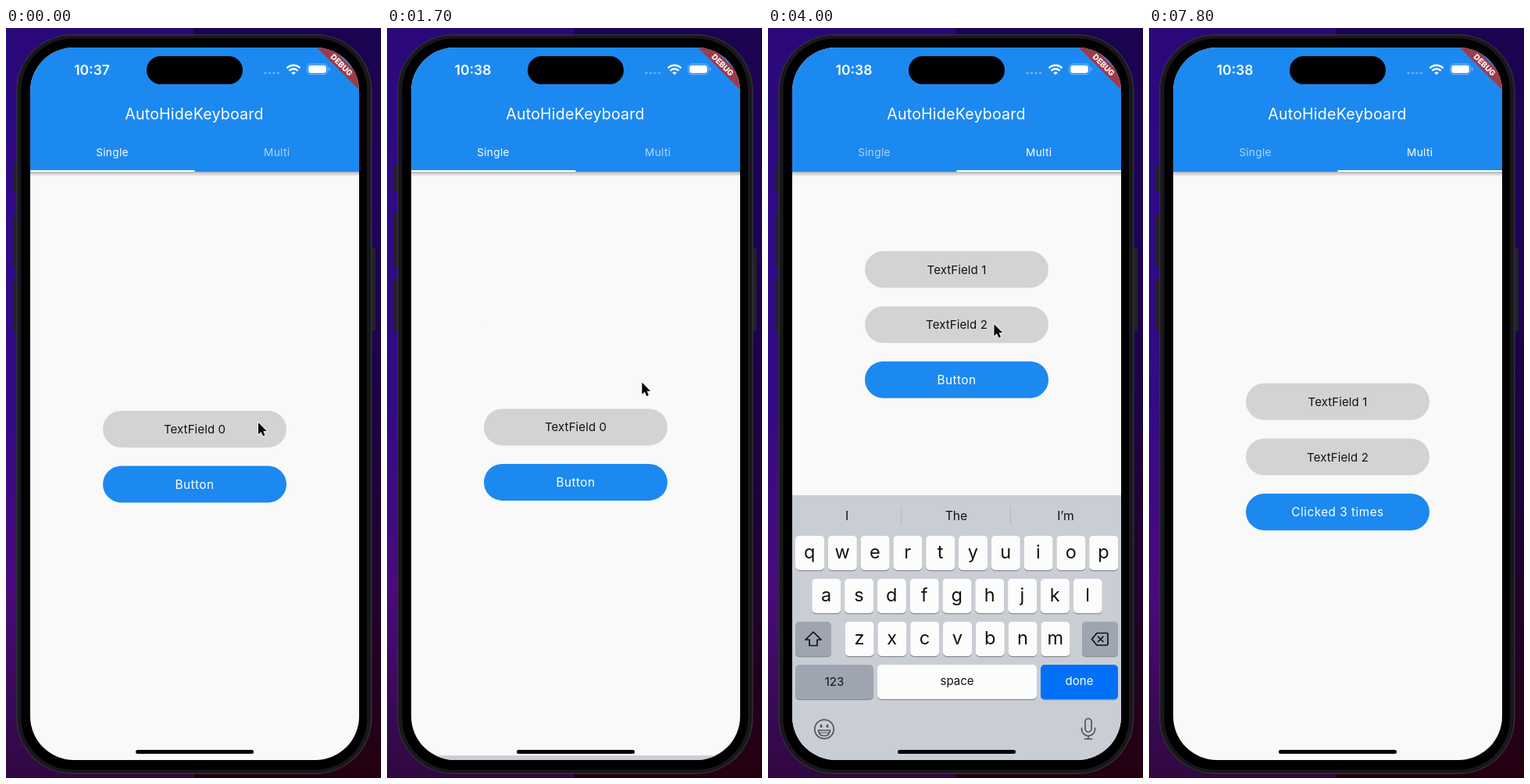
Animation, 480 px wide and 960 px high, one loop 7.9 s. Source, as an HTML page:

```html
<!DOCTYPE html>
<html lang="en">
<head>
<meta charset="utf-8">
<title>AutoHideKeyboard</title>
<style>
  html, body { margin: 0; width: 100%; height: 100%; overflow: hidden; background: #16002c; }
  svg { display: block; width: 100vw; height: 100vh; }
  text { font-family: Inter, Roboto, sans-serif; text-anchor: middle; }
</style>
</head>
<body>
<svg id="stage" viewBox="0 0 480 960"></svg>
<script>
const BLUE = '#1c89f0', PAPER = '#f9f9fa', FIELD = '#d3d3d4', INK = '#111113';
const KEYBOARD = '#c9ced5', GREY_KEY = '#9fa5b0', ICON = '#50555c';
const LOOP = 7900, PAGE = 421, KB = 339;

const rect = (x, y, w, h, fill, r = 0, extra = '') =>
  `<rect x="${x}" y="${y}" width="${w}" height="${h}" rx="${r}" fill="${fill}" ${extra}/>`;
const text = (s, x, y, size, fill = INK, extra = '') =>
  `<text x="${x}" y="${y}" font-size="${size}" fill="${fill}" ${extra}>${s}</text>`;
const fade = (id, ...colors) =>
  `<linearGradient id="${id}" x2="0" y2="1">${colors.map((c, i) =>
    `<stop offset="${i / (colors.length - 1)}" stop-color="${c}"/>`).join('')}</linearGradient>`;

const field = (n, y) => rect(124, y - 23.5, 235, 47, FIELD, 23.5) +
  text('TextField ' + n, 241.5, y + 5.5, 15, INK, 'letter-spacing=".1"') +
  rect(239, y - 10, 2, 20, INK, 0, `id="caret${n}"`);
const button = (id, y) => rect(124, y - 23.5, 235, 47, BLUE, 23.5) +
  text('Button', 241.5, y + 5.5, 15.3, '#fff', `id="${id}" letter-spacing=".5"`);
const key = (x, y, w, fill = '#fcfcfd') =>
  rect(x, y + 1.2, w, 44, '#898c92', 5) + rect(x, y, w, 44, fill, 5);
const keyRow = (letters, x, y) => [...letters].map((c, i) =>
  key(x + i * 41.8, y, 37) + text(c, x + i * 41.8 + 18.3, y + 28.5, 23.5)).join('');

const keyboard = rect(31, 598, 421, 345, KEYBOARD) +
  ['I', 'The', 'I’m'].map((s, i) => text(s, 101 + i * 140, 629.5, 15.7)).join('') +
  rect(170, 612, 1, 24, '#b0b5bc') + rect(310, 612, 1, 24, '#b0b5bc') +
  keyRow('qwertyuiop', 35, 650) + keyRow('asdfghjkl', 56.3, 705) + keyRow('zxcvbnm', 98.6, 760) +
  key(35, 760, 46, GREY_KEY) + key(402, 760, 46, GREY_KEY) +
  key(35, 815, 100, GREY_KEY) + key(140, 815, 204) + key(349, 815, 99, '#0271f8') +
  text('123', 85, 842, 15) + text('space', 242, 841, 15) + text('done', 398.5, 841, 15, '#fff') +
  `<g fill="none" stroke="${INK}" stroke-width="1.7" stroke-linejoin="round" stroke-linecap="round">
    <path d="M58 773L68 783H63V790.5H53V783H48Z"/>
    <path d="M421 774.5H433.5Q435 774.5 435 776V788.5Q435 790 433.5 790H421L414.5 782.2ZM422.5 779L429 785.5M429 779L422.5 785.5"/>
  </g>
  <g fill="none" stroke="${ICON}" stroke-width="1.7" stroke-linecap="round">
    <circle cx="72" cy="897.5" r="12.2"/>
    <path d="M64.5 899H79.5Q78.5 906 72 906T64.5 899Z"/>
    <path d="M65.5 902H78.5" stroke-width="1.2"/>
    <rect x="406" y="884" width="8" height="17" rx="4"/>
    <path d="M401.5 896V898A8.5 8 0 0 0 418.5 898V896M410 906V910M405.5 910H414.5"/>
  </g>
  <g fill="${ICON}"><ellipse cx="68" cy="893.5" rx="1.5" ry="2.2"/><ellipse cx="76" cy="893.5" rx="1.5" ry="2.2"/></g>`;

const statusBar = rect(180, 36, 123, 36, '#000', 18) +
  text('10:37', 110, 59.7, 17.5, '#fff', 'id="clock" font-weight="600"') +
  [332, 337.5, 343, 348.5].map(x => `<circle cx="${x}" cy="57.5" r="1.6" fill="#fff" opacity=".35"/>`).join('') +
  `<g fill="none" stroke="#fff" stroke-width="2.5">
    <path d="M359.5 51.3A12 12 0 0 1 376.5 51.3M362.5 54.6A7.8 7.8 0 0 1 373.5 54.6"/>
    <path d="M365.3 57.3A4 4 0 0 1 370.7 57.3L368 60Z" fill="#fff" stroke="none"/>
  </g>` +
  rect(385.5, 46, 26, 13.5, 'none', 4.3, 'stroke="#fff" stroke-opacity=".4"') +
  rect(387.2, 47.7, 22.6, 10.1, '#fff', 3) + rect(413, 50.5, 1.5, 4.5, '#fff', .7, 'opacity=".4"') +
  `<g transform="translate(429.7 47.3) rotate(45)">` + rect(-50, -6.8, 100, 13.6, '#a03a48') +
  text('DEBUG', 0, 3.6, 10, '#fff', 'font-weight="800"') + '</g>';

const header = rect(31, 184, 421, 6, 'url(#shade)') + rect(31, 25, 421, 159, BLUE) +
  '<g clip-path="url(#tab)"><circle id="ripple" cx="350" cy="171" fill="#4b9cec"/></g>' +
  text('AutoHideKeyboard', 241, 116.7, 19.6, '#fff', 'letter-spacing=".2"') +
  text('Single', 136, 164, 13.6, '#fff', 'id="tab0" letter-spacing=".35"') +
  text('Multi', 346.7, 164, 13.6, '#fff', 'id="tab1" letter-spacing=".35"') +
  rect(31, 182, 210.5, 2, '#fff', 0, 'id="indicator"');

const sideButtons = [[9, 176, 33], [9, 238, 68], [9, 321, 67], [467, 282, 106]]
  .map(([x, y, h]) => rect(x, y, 6, h, '#222126', 2)).join('');

stage.innerHTML = `<defs>
    ${fade('left', '#2a0878', '#300a88', '#330a86', '#4a0a7c', '#300840')}
    ${fade('right', '#1b0350', '#1d0458', '#1c0344', '#20022c', '#240010')}
    ${fade('shade', '#b3b4b8', PAPER)}
    <clipPath id="screen">${rect(31, 25, 421, 912, '#000', 56)}</clipPath>
    <clipPath id="tab">${rect(241.5, 137, 210.5, 47, '#000')}</clipPath>
  </defs>` +
  rect(0, 0, 240, 960, 'url(#left)') + rect(240, 0, 240, 960, 'url(#right)') + sideButtons +
  rect(13, 8, 455.5, 947, '#323136', 72) + rect(14.5, 9.5, 452.5, 944, '#18171b', 70) +
  rect(19.5, 13.5, 442.5, 936, '#000', 66) +
  '<g clip-path="url(#screen)">' + rect(31, 25, 421, 912, PAPER) +
  `<g id="page0">${field(0, 513.5)}${button('button0', 584)}</g>` +
  `<g id="page1">${field(1, 478.3)}${field(2, 549)}${button('button1', 619.5)}</g>` +
  header + statusBar + `<g id="keys">${keyboard}</g>` + rect(166, 924, 151, 5, '#000', 2.5) + '</g>' +
  '<path id="pointer" d="M0 0V15L3.5 11.9L6 17.3L8.5 16.2L6.2 10.9H10.8Z" fill="#000" stroke="#fff" stroke-width="1.6" paint-order="stroke"/>';

const $ = id => document.getElementById(id);
const clamp = x => Math.min(1, Math.max(0, x));
const move = (id, x, y) => $(id).setAttribute('transform', `translate(${x} ${y})`);
const show = (id, on) => $(id).setAttribute('visibility', on ? 'visible' : 'hidden');

// Critically damped step
const spring = t => t <= 0 ? 0 : 1 - Math.exp(-t / 50) * (1 + t / 50);
// How far the keyboard is up, 0 to 1
const raised = t => spring(t - 560) - spring(t - 1400) + spring(t - 3368) - spring(t - 5300);

// time, x, y of the pointer
const route = [[0, 323, 505], [300, 322, 507], [1500, 322, 507], [2300, 350, 170], [2700, 350, 170],
  [3250, 273, 473], [3600, 273, 473], [4050, 290, 376], [4400, 290, 376], [5000, 299, 447],
  [5400, 299, 447], [5850, 326, 639], [6400, 326, 639], [7000, 486, 700], [LOOP, 486, 700]];
// field, focus time, blur time
const focus = [[0, 560, 1400], [1, 3368, 4200], [2, 4200, 5300]];
const clicks = [5300, 5900, 6150];

function draw(t) {
  const slide = 1 - (1 - clamp((t - 2500) / 300)) ** 2.1;
  // The page leads the keyboard slightly
  const lift = -169.3 * raised(t + 6);
  move('keys', 0, KB * (1 - raised(t)));
  move('page0', -PAGE * slide, lift);
  move('page1', PAGE * (1 - slide), lift);
  move('indicator', 210.5 * slide, 0);
  $('tab0').setAttribute('opacity', 1 - .35 * slide);
  $('tab1').setAttribute('opacity', .65 + .35 * slide);

  const grow = clamp((t - 2400) / 225);
  $('ripple').setAttribute('r', t < 2400 ? 0 : 30 + 87 * grow);
  $('ripple').setAttribute('opacity', clamp((t - 2400) / 75) * clamp((2900 - t) / 250));

  for (const [n, from, to] of focus)
    show('caret' + n, t >= from && t < to && (t - from) % 1000 < 500);
  const count = clicks.filter(c => t >= c).length;
  $('button1').textContent = count ? `Clicked ${count} times` : 'Button';
  $('clock').textContent = t < 600 ? '10:37' : '10:38';

  const i = route.findIndex(p => p[0] > t);
  const [t0, x0, y0] = route[i - 1], [t1, x1, y1] = route[i];
  const u = (t - t0) / (t1 - t0), s = u * u * (3 - 2 * u);
  move('pointer', x0 + (x1 - x0) * s, y0 + (y1 - y0) * s);
}

const start = performance.now();
(function tick() {
  draw((performance.now() - start) % LOOP);
  requestAnimationFrame(tick);
})();
</script>
</body>
</html>
```
